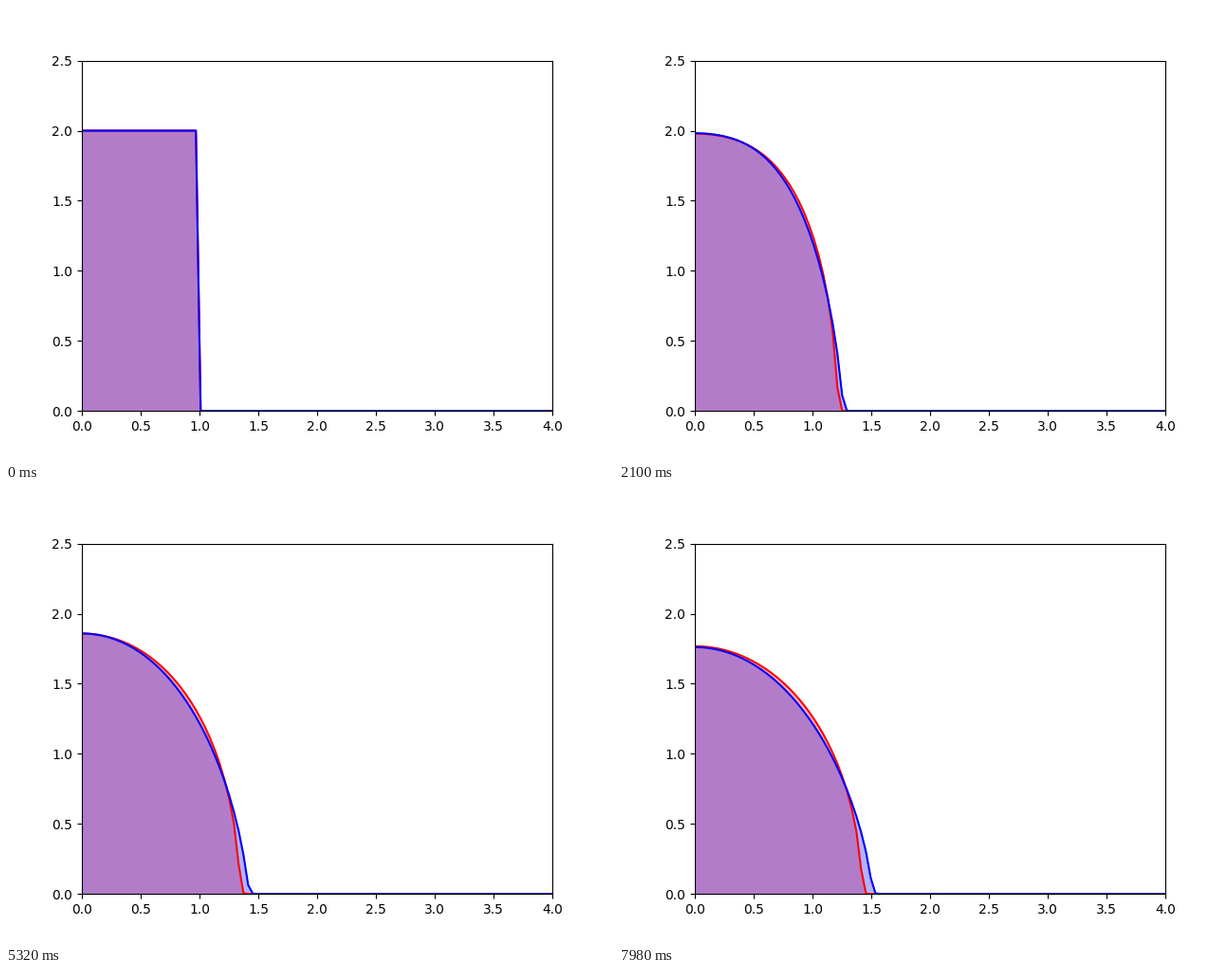
Recreate the animation shown at these times as a matplotlib script. Size 640 by 480 pixels, loop 8 s.

```python
import numpy as np
import matplotlib.pyplot as plt
from matplotlib.animation import FuncAnimation

TICK_MS = 20        # timer interval
TICKS_PER_STEP = 7  # the curves advance every 140 ms
TICKS = 400
SUBSTEPS = 28

x = np.linspace(0, 4, 100)


def diffuse(u, rate, power):
    """One explicit step of u_t = (rate * u**power * u_x)_x, no flux at the ends."""
    d = u ** power
    flux = rate * (d[1:] + d[:-1]) / 2 * np.diff(u)
    du = np.zeros_like(u)
    du[:-1] += flux
    du[1:] -= flux
    du[[0, -1]] *= 2  # half cells at the boundaries
    return u + du


def solve(rate, power, steps):
    u = np.where(x < 1, 2.0, 0.0)
    history = [u]
    for _ in range(steps):
        for _ in range(SUBSTEPS):
            u = diffuse(u, rate / SUBSTEPS, power)
        history.append(u)
    return history


steps = (TICKS - 1) // TICKS_PER_STEP
# rates are in units of dx**2 per step
curves = [
    ("red", solve(1.0, 2.0, steps)),
    ("blue", solve(1.27, 1.5, steps)),
]

plt.rcParams["font.family"] = "DejaVu Sans"
fig, ax = plt.subplots(figsize=(6.4, 4.8), dpi=100)
ax.set_xlim(0, 4)
ax.set_ylim(0, 2.5)

lines, fills = [], []
for color, history in curves:
    lines.append(ax.plot(x, history[0], color=color, lw=1.5)[0])
    fills.append(ax.fill_between(x, history[0], color=color, alpha=0.3, lw=0))


def update(tick):
    step = tick // TICKS_PER_STEP
    for (_, history), line, fill in zip(curves, lines, fills):
        u = history[step]
        line.set_ydata(u)
        outline = np.column_stack([x, u])
        fill.set_verts([np.vstack([[0, 0], outline, [4, 0]])])
    return lines + fills


anim = FuncAnimation(fig, update, frames=TICKS, interval=TICK_MS,
                     repeat=True, repeat_delay=0)
plt.show()
```
